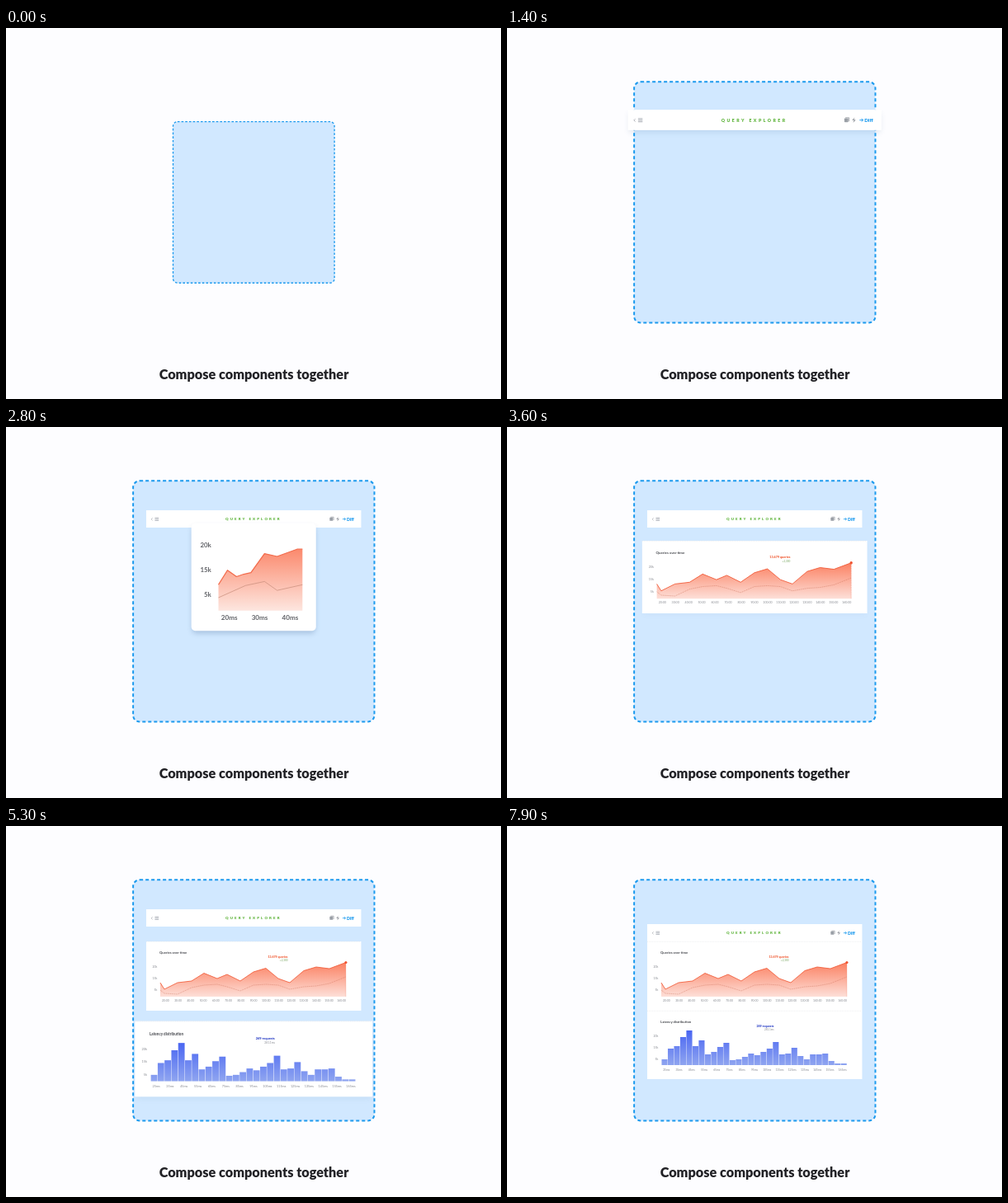
Recreate the animation shown at these times as an HTML page. Size 600 by 450 pixels, loop 8000 ms.

```html
<!DOCTYPE html>
<html lang="en">
<head>
<meta charset="utf-8">
<title>Compose components together</title>
<style>
  html, body { margin: 0; width: 100%; height: 100%; overflow: hidden; background: #fdfdff; }
  svg { display: block; width: 600px; height: 450px; font-family: Lato, "Open Sans", sans-serif; }
</style>
</head>
<body>
<svg id="stage" viewBox="0 0 600 450">
  <defs>
    <linearGradient id="redWide" gradientUnits="userSpaceOnUse" x1="0" y1="25" x2="0" y2="67">
      <stop offset="0" stop-color="#fb7f60"/><stop offset="1" stop-color="#fddfd8"/>
    </linearGradient>
    <linearGradient id="redMini" gradientUnits="userSpaceOnUse" x1="0" y1="30" x2="0" y2="108">
      <stop offset="0" stop-color="#fb7250"/><stop offset="1" stop-color="#fde2da"/>
    </linearGradient>
    <linearGradient id="blueWide" gradientUnits="userSpaceOnUse" x1="0" y1="24" x2="0" y2="66">
      <stop offset="0" stop-color="#4a66f2"/><stop offset="1" stop-color="#8fa5f0"/>
    </linearGradient>
    <linearGradient id="blueMini" gradientUnits="userSpaceOnUse" x1="0" y1="14" x2="0" y2="106">
      <stop offset="0" stop-color="#4a63f6"/><stop offset="1" stop-color="#8098ea"/>
    </linearGradient>
    <filter id="soft" x="-20%" y="-20%" width="140%" height="150%"><feGaussianBlur stdDeviation="3"/></filter>
  </defs>
</svg>
<script>
const LOOP = 8000;
const stage = document.getElementById('stage');

function el(tag, attrs, parent, text) {
  const node = document.createElementNS('http://www.w3.org/2000/svg', tag);
  set(node, attrs);
  if (text !== undefined) node.textContent = text;
  return parent.appendChild(node);
}
function set(node, attrs) {
  for (const k in attrs) node.setAttribute(k, attrs[k]);
}
function label(parent, x, y, size, fill, text, extra) {
  return el('text', { x, y, 'font-size': size, fill, ...extra }, parent, text);
}
const END = { 'text-anchor': 'end' };
const MID = { 'text-anchor': 'middle' };
const BOLD = { 'font-weight': 700 };

const mix = (a, b, t) => a + (b - a) * t;
const part = (t, a, b) => Math.min(1, Math.max(0, (t - a) / (b - a)));
const quad = t => t < .5 ? 2 * t * t : 1 - 2 * (1 - t) * (1 - t);
const sine = t => (1 - Math.cos(Math.PI * t)) / 2;

// Drop zone and caption
const zone = el('g', {}, stage);
el('rect', { x: -146.2, y: -146.2, width: 292.4, height: 292.4, rx: 8, fill: '#d1e8ff',
  stroke: '#1c9aee', 'stroke-width': 2, 'stroke-dasharray': '4 3' }, zone);
label(stage, 300.5, 426, 16.25, '#222226', 'Compose components together', { ...MID, 'font-weight': 900 });

// Contents
function paintHeader(g) {
  el('path', { d: 'M7.6 9.4l-1.4 1.4 1.4 1.4', fill: 'none', stroke: '#8a8f98', 'stroke-width': .6 }, g);
  el('path', { d: 'M10.5 9.2h4.6M10.5 10.8h4.6M10.5 12.4h4.6', stroke: '#a3a8b0', 'stroke-width': .8 }, g);
  label(g, 96, 12.3, 4.4, '#5cb338', 'QUERY EXPLORER', { 'font-weight': 900, 'letter-spacing': 2.1 });
  el('rect', { x: 222.4, y: 8.8, width: 4, height: 4, rx: .6, fill: '#9a9fa6' }, g);
  el('path', { d: 'M223.4 8.2h3.8v3.8', fill: 'none', stroke: '#868b93', 'stroke-width': .6 }, g);
  el('path', { d: 'M232.6 8.6l-1.6 2h2.4l-1.6 2.2', fill: 'none', stroke: '#777c84', 'stroke-width': .7 }, g);
  el('path', { d: 'M238 10.7h3.6M240 9.2l1.6 1.5-1.6 1.5', fill: 'none', stroke: '#1c9aee', 'stroke-width': .8 }, g);
  label(g, 243.1, 12.5, 5.1, '#1c9aee', 'Diff', { 'font-weight': 900 });
}

function paintPalette(g) {
  label(g, 13.5, 55, 53.5, 'none', 'Aa', { 'font-family': '"Liberation Sans", Arial, sans-serif', 'font-weight': 700,
    'letter-spacing': -4, stroke: '#fff', 'stroke-width': 1.1 });
  const shape = (d, opacity) => el('path', { d, fill: '#fff', opacity }, g);
  el('rect', { x: 95, y: 16, width: 15, height: 15.5, rx: 3, fill: '#fff', opacity: .83 }, g);
  el('circle', { cx: 129.3, cy: 24, r: 5.2, fill: 'none', stroke: '#fff', 'stroke-width': 4.4, opacity: .68 }, g);
  shape('M148 16.5h15v15h-15z', .36);
  shape('M96 55.5a13.5 13.5 0 0 1 13.5-13.5v13.5z', .62);
  shape('M129.5 42l7.6 13.5h-15.2z', .52);
  shape('M151 42h5.5v5h5.5v8.5h-5.5v-5h-5.5z', .36);
}

function frame(g, title, unit, first, noteX, note, sub, colour, subColour) {
  el('path', { d: 'M0 .3H260', stroke: '#dcdee2', 'stroke-width': .5, 'stroke-dasharray': '1 1' }, g);
  label(g, 16, 15.3, 4.2, '#44464c', title, BOLD);
  ['20k', '15k', '5k'].forEach((s, i) => label(g, 13.4, 31.6 + i * 14.1, 3.5, '#85888f', s, END));
  for (let i = 0; i < 15; i++)
    label(g, 23.3 + i * 15.25, 72.9, 3.4, '#85888f', first + i * 10 + unit, MID);
  label(g, noteX, 20.2, 3.6, colour, note, { ...END, 'font-weight': 900 });
  label(g, noteX, 24.4, 3, subColour, sub, END);
}

const line = (xs, ys) => xs.map((x, i) => (i ? 'L' : 'M') + x + ' ' + ys[i]).join('');

function area(g, xs, ys, base, fill, width) {
  const d = line(xs, ys);
  el('path', { d: d + `V${base}H${xs[0]}z`, fill }, g);
  el('path', { d, fill: 'none', stroke: '#f0532f', 'stroke-width': width, 'stroke-linejoin': 'round' }, g);
}

function paintQueries(g) {
  frame(g, 'Queries over time', ':00', 20, 171.5, '13,679 queries', '+2,300', '#f0603a', '#74a35c');
  const xs = [17, 22, 38, 55, 70, 86, 98, 114, 130, 145, 160, 174, 191, 206, 222, 242];
  area(g, xs, [50, 58, 50, 48, 38.5, 45, 40, 48, 37, 32.5, 45, 50, 35.5, 31, 33, 25.5], 67, 'url(#redWide)', .8);
  el('path', { d: line(xs, [59, 63, 64, 56, 53, 52, 55, 60, 53, 52, 53, 58, 55, 54, 51, 43]), fill: 'none',
    stroke: '#c96b55', 'stroke-width': .45, 'stroke-dasharray': '1 .7' }, g);
  el('path', { d: 'M242 25.5V67', stroke: '#f0532f', 'stroke-width': .4, 'stroke-dasharray': '1 1' }, g);
  el('circle', { cx: 242, cy: 25.5, r: 1.6, fill: '#f0532f' }, g);
}

function paintLatency(g) {
  frame(g, 'Latency distribution', 'ms', 25, 153.5, '269 requests', '281.1ms', '#3347c8', '#85888f');
  const bars = [7, 20, 23, 34, 42, 23, 30, 13, 16, 22, 27, 6, 7, 10, 14, 12, 16, 20, 28, 13, 14, 21, 11, 7, 13, 13, 14, 5, 2, 2];
  bars.forEach((h, i) => el('rect', { x: 17.5 + i * 7.49, y: 66 - h, width: 7.1, height: h, fill: 'url(#blueWide)' }, g));
}

function miniAxes(g) {
  ['20k', '15k', '5k'].forEach((s, i) => label(g, 22, 29.3 + i * 30.8, 7.2, '#44464c', s, { ...END, ...BOLD }));
  ['20ms', '30ms', '40ms'].forEach((s, i) => label(g, 42 + i * 33.7, 119.4, 7.4, '#44464c', s, { ...MID, ...BOLD }));
}

function paintMiniQueries(g) {
  miniAxes(g);
  area(g, [30, 40, 50, 58, 66, 81, 95, 117, 123], [76, 58, 66, 63, 61, 37.5, 41, 32, 32], 108, 'url(#redMini)', 1.2);
  el('path', { d: 'M30 92L60 77L81 72L95 83L123 76', fill: 'none', stroke: '#c07a66', 'stroke-width': .7 }, g);
}

function paintMiniLatency(g) {
  miniAxes(g);
  [51, 92, 76, 51, 45, 16].forEach((h, i) =>
    el('rect', { x: 29.8 + i * 15.75, y: 106 - h, width: 14.9, height: h, fill: 'url(#blueMini)' }, g));
}

// Each card slides in large, shrinks, unfolds to its wide form and settles.
const cards = [
  { start: 300, slide: 650, x0: -160, y0: 118, y1: 133.3, y2: 111.5, w: 183.2, h: 71.5, high: 21, fill: [88, 180, 52],
    mini: paintPalette, wide: paintHeader, shift: [5700, 6150, 18] },
  { start: 2100, slide: 740, x0: -116, y0: 173.5, y1: 182, y2: 182, w: 138, h: 133, high: 84, fill: [255, 255, 255],
    mini: paintMiniQueries, wide: paintQueries },
  { start: 3900, slide: 740, x0: -116, y0: 173.5, y1: 287.5, y2: 282.5, w: 138, h: 133, high: 83, fill: [255, 255, 255],
    mini: paintMiniLatency, wide: paintLatency, shift: [6400, 6950, -17] }
];

cards.forEach((c, i) => {
  const filter = el('filter', { id: 'move' + i }, stage.querySelector('defs'));
  c.blur = el('feGaussianBlur', { stdDeviation: '0 0' }, filter);
  c.filter = `url(#move${i})`;
  c.group = el('g', {}, stage);
  c.shade = el('rect', { fill: '#3a5f8f', filter: 'url(#soft)' }, c.group);
  c.body = el('rect', {}, c.group);
  c.small = el('g', {}, c.group);
  c.large = el('g', {}, c.group);
  c.mini(c.small);
  c.wide(c.large);
});

function pose(c, now) {
  const p = now - c.start;
  c.group.style.display = p < 0 ? 'none' : '';
  if (p < 0) return;

  const run = part(p, -70, c.slide - 70);
  const cx = mix(c.x0, 300.2, sine(run));
  const speed = (300 - c.x0) * Math.PI / 2 / c.slide * Math.sin(Math.PI * run);
  const drop = quad(part(p, 200, 600));
  const open = quad(part(p, 640, 950));
  const size = mix(1.6, 1, drop);
  const grow = mix(1.18, 1, quad(part(p, 1150, 1700)));
  const w = mix(c.w * size, 260.5 * grow, open);
  const h = mix(c.h * size, c.high * grow, open);
  let cy = mix(mix(c.y0, c.y1, drop), c.y2, open);
  if (c.shift) cy += c.shift[2] * quad(part(now, c.shift[0], c.shift[1]));

  const x = cx - w / 2, y = cy - h / 2, rx = mix(5, 0, open);
  set(c.body, { x, y, width: w, height: h, rx,
    fill: `rgb(${c.fill.map(v => Math.round(mix(v, 255, open)))})` });
  set(c.shade, { x: x + 1, y: y + 4, width: w - 2, height: h - 1, rx,
    opacity: .3 * (1 - open) + .12 * open * (grow - 1) / .18 });
  set(c.small, { transform: `translate(${x} ${y}) scale(${w / c.w} ${h / c.h})`, opacity: 1 - part(open, 0, .5) });
  const k = w / 260.5;
  set(c.large, { transform: `translate(${x} ${cy - c.high * k / 2}) scale(${k})`, opacity: part(open, .5, 1) });

  if (speed > .15) {
    set(c.blur, { stdDeviation: `${(speed - .15) * 5.6} 0` });
    set(c.group, { filter: c.filter });
  } else c.group.removeAttribute('filter');
}

function draw(time) {
  const now = time % LOOP;
  const s = mix(.669, 1, quad(part(now, 750, 1142)));
  set(zone, { transform: `translate(300.3 211.4) scale(${s})` });
  cards.forEach(c => pose(c, now));
}

const begin = performance.now();
function tick() {
  draw(performance.now() - begin);
  requestAnimationFrame(tick);
}
draw(0);
requestAnimationFrame(tick);
</script>
</body>
</html>
```
